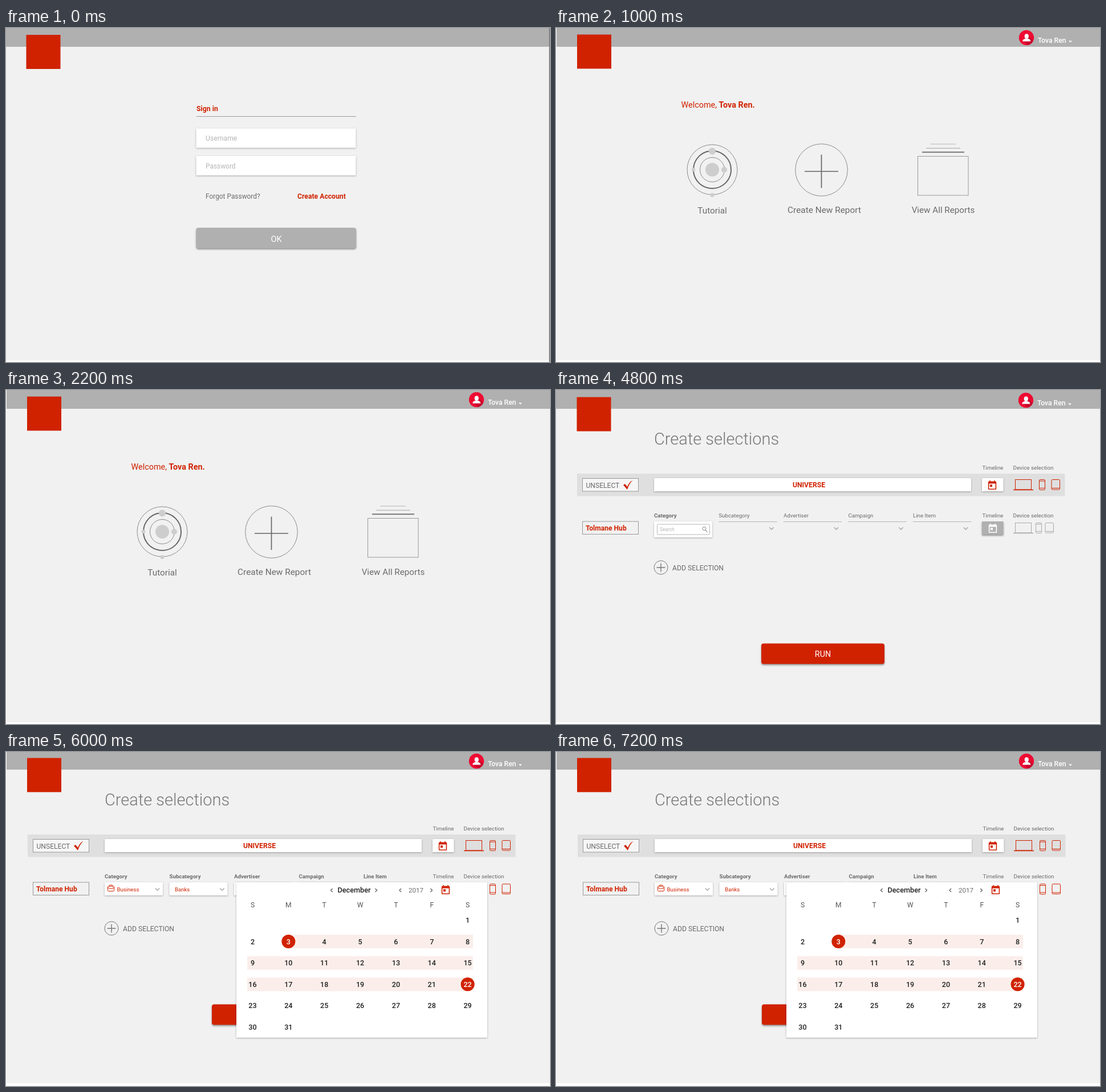
An HTML page for the animation above (8000 ms loop, 954x587 px).

```html
<!DOCTYPE html>
<html lang="en">
<head>
<meta charset="utf-8">
<title>Report tool</title>
<style>
html, body { margin: 0; width: 100%; height: 100%; overflow: hidden; background: #fff; }
svg { display: block; width: 954px; height: 587px; }
text { font-family: Roboto, "Open Sans", sans-serif; white-space: pre; }
.card { fill: #fff; filter: drop-shadow(0 1px 1.5px rgba(0,0,0,.3)); }
.btn { filter: drop-shadow(0 2px 1.5px rgba(0,0,0,.4)); }
</style>
</head>
<body>
<svg id="stage" viewBox="0 0 954 587"></svg>
<script>
const RED = '#d02200', GREY = '#b0b0b0', DARK = '#6b6b6b', PAGE = '#f1f1f1';
const USER = 'Tova Ren';

const text = (x, y, size, str, fill = DARK, weight = 400, anchor = 'start') =>
  `<text x="${x}" y="${y}" font-size="${size}" fill="${fill}" font-weight="${weight}" text-anchor="${anchor}">${str}</text>`;
const mid = (x, y, size, str, fill, weight) => text(x, y, size, str, fill, weight, 'middle');
const rect = (x, y, w, h, attrs) => `<rect x="${x}" y="${y}" width="${w}" height="${h}" ${attrs}/>`;
const fillRect = (x, y, w, h, fill) => rect(x, y, w, h, `fill="${fill}"`);
const card = (x, y, w, h) => rect(x, y, w, h, 'class="card"');
const button = (x, y, w, h, fill) => rect(x, y, w, h, `rx="4" class="btn" fill="${fill}"`);
const frame = (x, y, w, h, color, rx = 0) => rect(x, y, w, h, `rx="${rx}" fill="none" stroke="${color}"`);
const disc = (x, y, r, fill) => `<circle cx="${x}" cy="${y}" r="${r}" fill="${fill}"/>`;
const ring = (x, y, r, color, width = 1) =>
  `<circle cx="${x}" cy="${y}" r="${r}" fill="none" stroke="${color}" stroke-width="${width}"/>`;
const line = (d, color, width = 1) => `<path d="${d}" fill="none" stroke="${color}" stroke-width="${width}"/>`;
const shape = (d, fill) => `<path d="${d}" fill="${fill}"/>`;
const move = (x, y, body) => `<g transform="translate(${x} ${y})">${body}</g>`;

const page = (left, bar, bottom) =>
  fillRect(left, 0, 954, bottom, PAGE) + fillRect(left, 0, 954, bar, GREY);
const logo = (x, y) => fillRect(x, y, 60, 60, RED);
const account = () =>
  disc(824, 18, 13.2, '#ee0a32') +
  shape('M827 14l9 9a13 13 0 0 1-9 8l-9-8z', '#c8062c') +
  `<ellipse cx="824.3" cy="15.5" rx="3.6" ry="4.3" fill="#fff"/>` +
  shape('M817.5 24.5v-1.5q0-2 5-3.5h3.6q5 1.500 5 3.500v1.500z', '#fff') +
  text(844, 27, 12.2, USER, '#fff', 500) +
  shape('M898 23.500h6l-3 3z', '#fff');

function signIn() {
  return page(0, 33, 584.5) + fillRect(952.5, 0, 1.5, 587, '#777') + logo(35.5, 12) +
    text(334, 146, 12.3, 'Sign in', RED, 700) + line('M334 155.5H614', '#9b9b9b') +
    card(333.5, 176.5, 280, 34) + text(350, 198, 12.2, 'Username', '#b5b5b5') +
    card(333.5, 225, 280, 34) + text(350, 246.5, 11.9, 'Password', '#b5b5b5') +
    text(350, 299.5, 11.9, 'Forgot Password?') +
    text(511, 299.5, 12.2, 'Create Account', RED, 700) +
    button(333.5, 351, 280.5, 36, GREY) + mid(474, 376, 14.6, 'OK', '#fff');
}

function welcome() {
  const tutorial = ring(274, 249, 44, '#8a8a8a') + ring(274, 249, 33, '#666', 2) +
    ring(274, 249, 21.5, '#8a8a8a') +
    [[274, 249, 12], [274, 216.5, 6], [295, 249, 5], [241, 249, 3.2], [274, 293.5, 3.5]]
      .map(d => disc(...d, '#cdcdcd')).join('');
  const create = ring(465.5, 249.5, 45.8, '#8a8a8a') +
    line('M436 252H495M465.5 222.5V281', '#666', 1.7);
  const reports = line('M656.5 204H701', '#b5b5b5') + line('M649 211.3H709', '#b5b5b5', 1.2) +
    line('M642 218.3H716', '#777', 2) + frame(634.5, 225.5, 88.5, 68.5, '#999');
  return page(1, 33, 584) + logo(37, 11.5) + move(1, -1, account()) +
    text(219.5, 140, 14.4, `Welcome, <tspan font-weight="600">${USER}.</tspan>`, RED) +
    tutorial + create + reports +
    mid(274, 325.5, 15.3, 'Tutorial') + mid(470.5, 324.5, 15.4, 'Create New Report') +
    mid(679, 324.5, 15.2, 'View All Reports');
}

const today = (cx, cy, fill) => `<path transform="translate(${cx - 9.6} ${cy - 8.8}) scale(.8)" fill="${fill}" d="M19 3h-1V1h-2v2H8V1H6v2H5a2 2 0 0 0-2 2v14a2 2 0 0 0 2 2h14a2 2 0 0 0 2-2V5a2 2 0 0 0-2-2zm0 16H5V8h14zM7 10h5v5H7z"/>`;
const chevron = (x, y) => line(`M${x - 3.7} ${y - 2}l3.700 3.700 3.700-3.700`, '#999', 1.1);

// Laptop, phone and tablet outlines
const devices = (y, phoneX, tabletX, color) =>
  frame(805.5, y, 28, 17.5, color) + line(`M802 ${y + 18}H837`, color, 1.6) +
  frame(phoneX, y, 10, 18, color, 1.8) +
  line(`M${phoneX} ${y + 2.5}h10m-10 12.500h10`, color) +
  frame(tabletX, y, 14.5, 17.5, color, 1.8) +
  line(`M${tabletX} ${y + 15}h14.500`, color);

const universe = () =>
  text(747.5, 139.5, 9.7, 'Timeline') + text(801.5, 139.5, 9.8, 'Device selection') +
  fillRect(37, 147, 855.5, 39.5, '#dfdfdf') +
  rect(46.5, 155.5, 98, 22.5, 'fill="#f6f6f6" stroke="#999"') +
  text(52.5, 171.5, 12.1, 'UNSELECT') +
  shape('M118 167l3-2 4 5Q128 162 134.500 158.500 128 165 125 175z', RED) +
  card(172, 155, 556, 23) + mid(443.5, 171.3, 12.2, 'UNIVERSE', RED, 700) +
  card(747, 155, 37.5, 23) + today(765, 167, RED) + devices(157.5, 847.5, 869, RED);

function columns(chosen) {
  const names = ['Category', 'Subcategory', 'Advertiser', 'Campaign', 'Line Item'];
  return names.map((name, i) => {
    const x = 172 + i * 113.5;
    const label = text(x, 223.5, 9.7, name, DARK, chosen || !i ? 700 : 400);
    if (chosen) return label + card(x, 231, 102, 23) + chevron(x + 92.5, 243.5);
    if (i) return label + line(`M${x} 231.5h102`, '#b5b5b5') + chevron(x + 92.5, 243.5);
    return label + card(172, 231, 102, 28) + frame(177.5, 236, 92, 18, '#b5b5b5', 1.5) +
      text(182, 248, 8.4, 'Search', '#b5b5b5') +
      ring(260, 243.5, 3, '#888') + line('M262.2 246l3 4', '#888', 1.2);
  }).join('');
}

function selections(chosen) {
  const briefcase = frame(177.5, 238, 11, 8.5, RED, 1) +
    line('M180.5 238v-2h5v2M177.5 240.500l5.500 2 5.500-2', RED);
  const picked = briefcase + text(193.5, 246.5, 9.6, 'Business', RED) +
    text(295, 246.5, 9.6, 'Banks', RED) + devices(234, 847.5, 869, RED);
  const idle = rect(747, 231, 37.5, 23, `fill="${GREY}" class="btn"`) +
    today(766, 243, '#fff') + devices(233.5, 841.5, 858, '#aaa');
  return text(172, 96, 29, 'Create selections', '#777', 300) + universe() +
    frame(46.5, 231, 98, 22.5, '#999') + text(52, 246.5, 12.1, 'Tolmane Hub', RED, 700) +
    columns(chosen) +
    text(747.5, 223.5, 9.7, 'Timeline') + text(801.5, 223.5, 9.8, 'Device selection') +
    (chosen ? picked : idle) +
    ring(184, 312, 12, '#777') + line('M176.500 312h15M184 304.500v15', '#777', 1.4) +
    text(204, 317, 12.2, 'ADD SELECTION') +
    button(360, 445.5, 216, 36, RED) + mid(468, 469, 14.3, 'RUN', '#fff');
}

const setup = () => page(0, 33, 584) + logo(36.5, 12.5) + account() + selections(false);

function calendar() {
  const INK = '#222', colX = i => 432.5 + i * 62.85, rowY = i => 295.5 + i * 37.6;
  const arrow = (x, y, dir) => line(`M${x - dir * 1.6} ${y - 3}l${dir * 3.2} 3l${-dir * 3.2} 3`, '#555', 1.1);
  let out = card(404, 229, 440, 273) +
    arrow(571, 243, -1) + text(581.5, 247, 12.7, 'December', INK, 500) + arrow(649, 243, 1) +
    arrow(691.5, 243, -1) + mid(719, 247, 11.6, '2017') + arrow(746, 243, 1) +
    today(771, 242, RED);
  [...'SMTWTFS'].forEach((d, i) => out += mid(colX(i), 273, 12.2, d, '#555'));
  for (let r = 1; r < 4; r++) {
    const x = r === 1 ? colX(1) : 423;
    out += fillRect(x, rowY(r) - 12, 819 - x, 24, '#fbeeea');
  }
  for (let d = 1; d <= 31; d++) {
    const x = colX((d + 5) % 7), y = rowY(Math.floor((d + 5) / 7)), end = d === 3 || d === 22;
    if (end) out += disc(x, y, 12, RED);
    out += mid(x, y + 4.5, 12.6, d, end ? '#fff' : INK, 500);
  }
  return out;
}

const picking = () => page(1, 31, 582) +
  move(1, -2, logo(36, 12.5) + account() + selections(true)) + calendar();

const starts = [0, 1000, 3000, 6000], LOOP = 8000;
const stage = document.getElementById('stage');
stage.innerHTML = [signIn, welcome, setup, picking].map(scene => `<g>${scene()}</g>`).join('');
const scenes = [...stage.children];

function draw() {
  const t = performance.now() % LOOP;
  const current = starts.filter(s => s <= t).length - 1;
  scenes.forEach((g, i) => g.style.display = i === current ? '' : 'none');
  requestAnimationFrame(draw);
}
draw();
</script>
</body>
</html>
```
